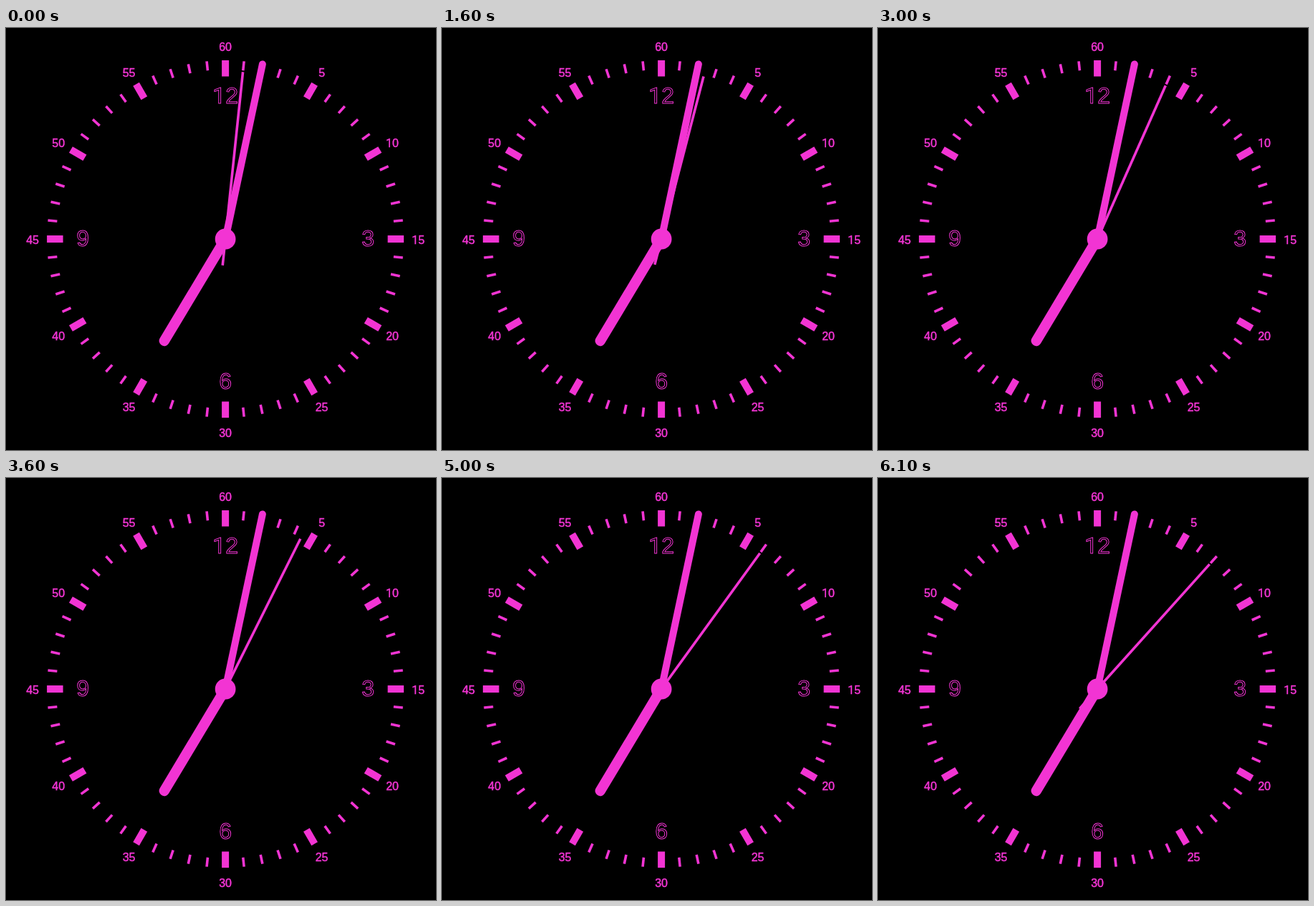
An HTML page for the animation above (6500 ms loop, 600 px wide and 588 px high).

```html
<!DOCTYPE html>
<html lang="en">
<head>
<meta charset="utf-8">
<title>Clock</title>
<style>
  html, body { margin: 0; width: 100%; height: 100%; overflow: hidden; background: #000; }
  svg { display: block; width: 100vw; height: 100vh; }
  text { font-family: "Liberation Sans", Arial, sans-serif; text-anchor: middle; }
  .one { font-family: Roboto, sans-serif; }
  .minutes { font-size: 16px; fill: #f234d3; stroke: #f234d3; stroke-width: .5; }
  .hours { font-size: 32px; fill: #000; stroke: #f234d3; stroke-width: 1; }
  line { stroke: #f234d3; }
  .round { stroke-linecap: round; }
</style>
</head>
<body>
<svg viewBox="0 0 600 588">
  <g id="labels"></g>
  <g transform="translate(306.1 294)">
    <g id="ticks"></g>
    <line class="round" y2="-165.5" stroke-width="14.5" transform="rotate(211)"/>
    <line class="round" y2="-249" stroke-width="10" transform="rotate(12)"/>
    <line id="second" y1="37" y2="-234" stroke-width="3.6"/>
    <circle r="14.4" fill="#f234d3"/>
  </g>
</svg>
<script>
const NS = "http://www.w3.org/2000/svg";
const LOOP = 6500, STEP = 100;
const TICK_START = 480, TICK_TIME = 265;
const ticks = document.getElementById("ticks");
const labels = document.getElementById("labels");
const second = document.getElementById("second");

function add(parent, name, attrs) {
  const el = document.createElementNS(NS, name);
  for (const key in attrs) el.setAttribute(key, attrs[key]);
  return parent.appendChild(el);
}

function addLabel(value, minute, cls, radius, cy, drop) {
  const a = minute * Math.PI / 30;
  const text = add(labels, "text", {
    class: cls,
    x: 306.1 + radius * Math.sin(a),
    y: cy - radius * Math.cos(a) + drop
  });
  // The digit 1 is set without a foot.
  for (const digit of String(value)) {
    add(text, "tspan", digit === "1" ? { class: "one" } : {}).textContent = digit;
  }
}

for (let m = 1; m <= 60; m++) {
  const major = m % 5 === 0;
  add(ticks, "line", {
    y1: major ? -226.5 : -236,
    y2: -249,
    "stroke-width": major ? 10 : 3.6,
    transform: `rotate(${m * 6})`
  });
  if (major) addLabel(m, m, "minutes", 269, 295, 5.7);
  if (m % 15 === 0) addLabel(m / 5, m, "hours", 199, 293, 11.3);
}

function secondAngle(t) {
  const shifted = t - TICK_START;
  if (shifted < 0) return 6;
  const n = Math.floor(shifted / 1000);
  const u = Math.min(1, (shifted - n * 1000) / TICK_TIME);
  return 6 * (1 + n + u * u * (3 - 2 * u));
}

function render(now) {
  const t = Math.floor((now % LOOP) / STEP) * STEP;
  second.setAttribute("transform", `rotate(${secondAngle(t)})`);
}

const start = performance.now();
function loop() {
  render(performance.now() - start);
  requestAnimationFrame(loop);
}
loop();
</script>
</body>
</html>
```
